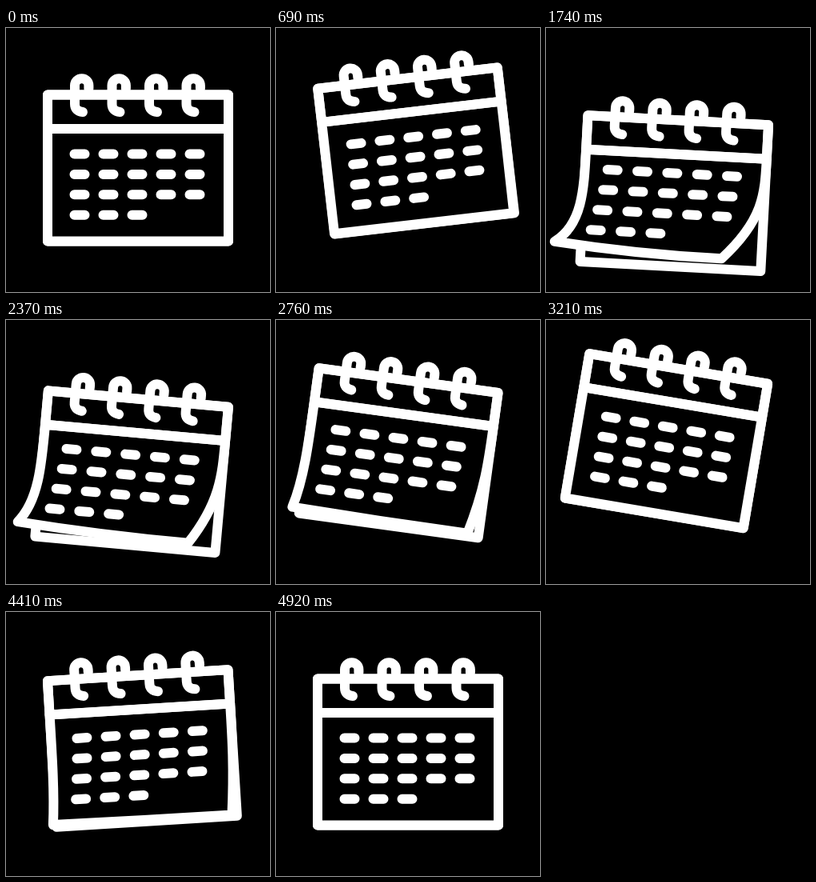
Animation of 330 by 330 pixels, one loop 5400 ms. Source, as an HTML page:

```html
<!DOCTYPE html>
<html lang="en">
<head>
<meta charset="utf-8">
<title>Swinging calendar</title>
<style>
html, body { margin: 0; width: 100%; height: 100%; overflow: hidden; background: #000; }
svg { display: block; width: 100vw; height: 100vh; }
#calendar { fill: none; stroke: #fff; stroke-width: 12; stroke-linecap: round; stroke-linejoin: round; }
#back, #page { fill: #000; }
</style>
</head>
<body>
<svg viewBox="0 0 330 330">
  <g id="calendar">
    <path id="back" d="M52 83.5H278V266.5H52Z"/>
    <path id="page"/>
    <path d="M52 126V83.5H278V126Z"/>
    <g id="dates"></g>
    <g id="rings"></g>
  </g>
</svg>
<script>
const LOOP = 5400, STEP = 30;
const LEFT = 52, RIGHT = 278, FOLD = 126, BOTTOM = 266.5;
const PIVOT = [165, 88];

// Each track is a list of [time, value] poses.
const lift = [[0, 0], [580, -22], [1830, 32.5], [3250, -22.7], [4880, 0]];
const tilt = [[0, 0], [600, -6.8], [1830, 3.2], [3270, 9.6], [4200, -4.6], [4860, 0]];
const bend = [[0, 0], [600, 0], [1830, 1.4], [3270, 0], [3980, 0.5], [4700, 0]];

const $ = id => document.getElementById(id);

function add(parent, d) {
  const path = document.createElementNS('http://www.w3.org/2000/svg', 'path');
  path.setAttribute('d', d);
  parent.append(path);
  return path;
}

function valueAt(track, time) {
  const next = track.findIndex(key => key[0] > time);
  if (next < 0) return track[track.length - 1][1];
  const [t0, v0] = track[next - 1], [t1, v1] = track[next];
  const ease = (1 - Math.cos(Math.PI * (time - t0) / (t1 - t0))) / 2;
  return v0 + (v1 - v0) * ease;
}

for (let i = 0; i < 4; i++) {
  const x = 86 + i * 46.5;
  add($('rings'), `M${x + 17.4} 76V71.9a8.7 8.7 0 0 0 -17.4 0V95q0 9 10 10`);
}

const rows = [5, 5, 5, 3].map(() => add($('dates'), ''));

// Dates slide further the lower they are, and spread slightly apart.
function rowPath(row, b) {
  const count = row < 3 ? 5 : 3;
  const slide = Math.sqrt(b) * (3 + 3 * row + 0.6 * row * row);
  const y = 157.5 + row * 25.4 - 4 * b * b;
  let d = '';
  for (let col = 0; col < count; col++) {
    d += `M${85.5 + col * 36 - slide + b * (col - 1.5)} ${y}h13`;
  }
  return d;
}

function pagePath(b) {
  const lx = LEFT - 24 * b, ly = BOTTOM - 17 * b;
  const rx = RIGHT - 36 * b, ry = BOTTOM - 9.5 * b;
  const mid = 226 - 4 * b;
  return `M${LEFT} ${FOLD}C${LEFT} 178 ${LEFT} ${mid} ${lx} ${ly}` +
    `Q${(lx + rx) / 2} ${(ly + ry) / 2 + 4 * b} ${rx} ${ry}` +
    `C${RIGHT} ${mid - 18} ${RIGHT} 170 ${RIGHT} ${FOLD}Z`;
}

function draw(time) {
  const b = valueAt(bend, time);
  $('calendar').setAttribute('transform',
    `translate(0 ${valueAt(lift, time)}) rotate(${valueAt(tilt, time)} ${PIVOT})`);
  $('page').setAttribute('d', pagePath(b));
  rows.forEach((path, row) => path.setAttribute('d', rowPath(row, b)));
}

const start = performance.now();
function frame() {
  const time = (performance.now() - start) % LOOP;
  draw(Math.floor(time / STEP) * STEP);
  requestAnimationFrame(frame);
}
frame();
</script>
</body>
</html>
```
